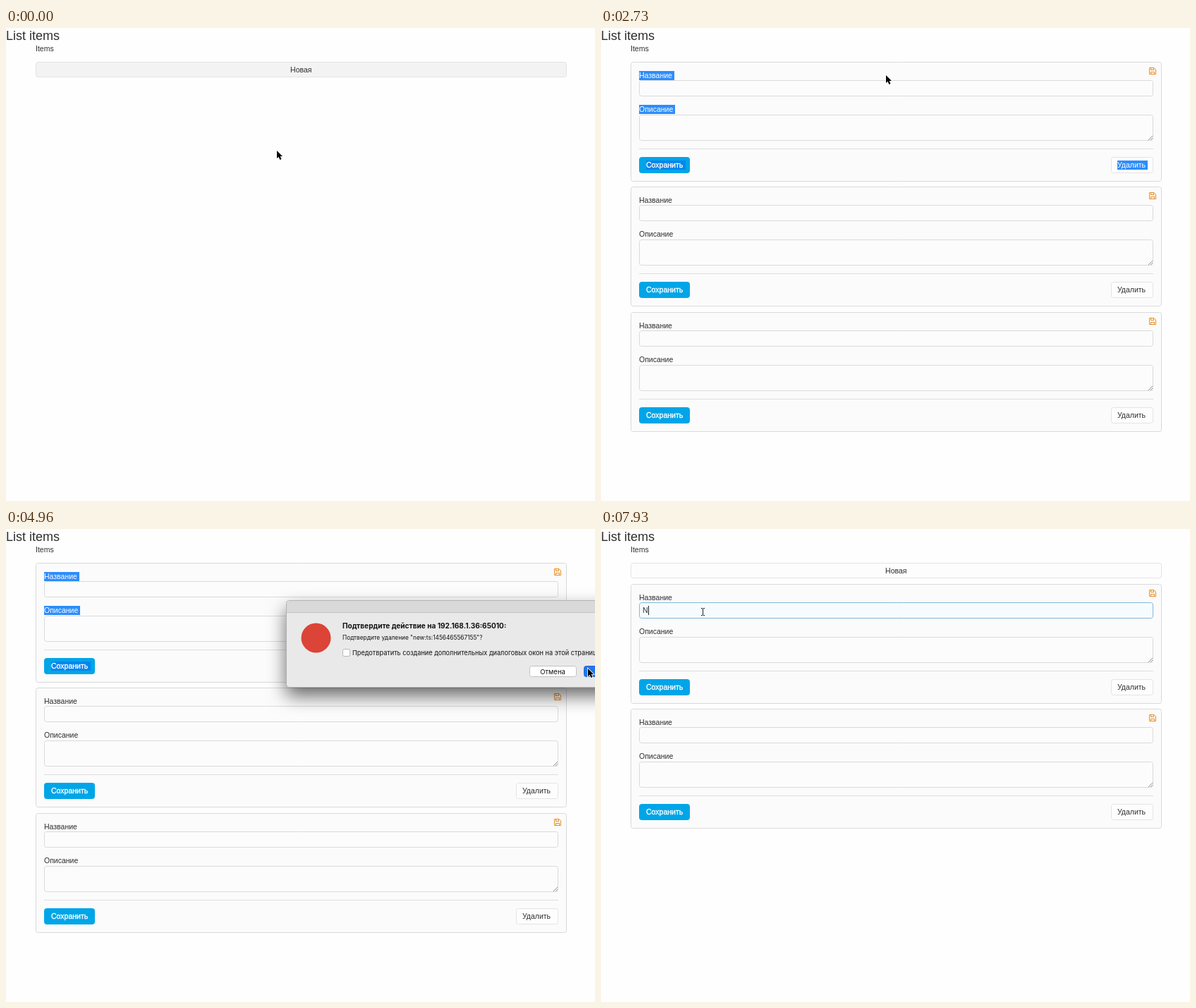
Write an HTML page with a canvas that moves like this. It is 835 by 671 pixels and loops after 8 s.

```html
<!DOCTYPE html>
<html lang="ru">
<head>
<meta charset="utf-8">
<title>List items</title>
<style>
html, body { margin: 0; width: 100%; height: 100%; overflow: hidden; background: #fefefe; }
canvas { display: block; }
</style>
</head>
<body>
<canvas id="stage" width="835" height="671"></canvas>
<script>
const ctx = document.getElementById('stage').getContext('2d');
const LOOP = 8000;
const INK = '#2e2e2e';
const SANS = '"Liberation Sans", Arial, sans-serif';
const SYSTEM = 'Inter, sans-serif';
const UI = '10.5px ' + SANS;
const SELECT = '#2d8dfb';

// [start time, value] lists: the last entry already reached wins.
const at = (steps, t) => steps.reduce((v, s) => (t >= s[0] ? s[1] : v), steps[0][1]);

const pointer = [
  [0, ['arrow', 384, 174]], [470, ['arrow', 388, 143]], [620, ['arrow', 398, 92]],
  [770, ['hand', 404, 67]], [2730, ['arrow', 404, 67]],
  [3470, ['arrow', 489, 170]], [3620, ['arrow', 690, 171]], [3760, ['arrow', 811, 180]],
  [3910, ['arrow', 728, 187]], [4510, ['arrow', 752, 190]], [4660, ['arrow', 794, 195]],
  [4810, ['arrow', 825, 198]], [5400, ['arrow', 760, 190]], [5550, ['arrow', 572, 173]],
  [5700, ['arrow', 227, 146]], [5850, ['beam', 144, 117]]
];
const dialogZoom = [[0, 0], [4060, 0.29], [4210, 0.95], [4360, 1], [5110, 0]];
const typed = [[0, ''], [7050, 'Т'], [7190, 'Ту'], [7640, 'Т'], [7790, ''], [7930, 'N']];
const caretOn = [[0, false], [6000, true], [6450, false], [6900, true]];

function box(x, y, w, h, r, fill, stroke) {
  ctx.beginPath();
  ctx.roundRect(x + 0.5, y + 0.5, w - 1, h - 1, r);
  if (fill) { ctx.fillStyle = fill; ctx.fill(); }
  if (stroke) { ctx.strokeStyle = stroke; ctx.lineWidth = 1; ctx.stroke(); }
}

function rect(x, y, w, h, color) {
  ctx.fillStyle = color;
  ctx.fillRect(x, y, w, h);
}

function text(str, x, y, font = UI, color = INK, align = 'left') {
  ctx.font = font;
  ctx.fillStyle = color;
  ctx.textAlign = align;
  ctx.fillText(str, x, y);
}

function poly(points, close) {
  ctx.beginPath();
  points.forEach(([x, y]) => ctx.lineTo(x, y));
  if (close) ctx.closePath();
}

function label(str, y, selected, width) {
  if (selected) rect(54, y - 10, width, 13, SELECT);
  text(str, 54, y, UI, selected ? '#fff' : INK);
}

function saveIcon(x, y) {
  ctx.strokeStyle = '#ea8e25';
  ctx.lineWidth = 1;
  poly([[x + .5, y + .5], [x + 7, y + .5], [x + 9.5, y + 3], [x + 9.5, y + 9.5], [x + .5, y + 9.5]], true);
  ctx.stroke();
  ctx.strokeRect(x + 2.5, y + 0.5, 4, 3);
  ctx.strokeRect(x + 2.5, y + 6.5, 5, 3);
}

function card(top, { icon = true, selected = false, hover = false, focus = 0, value = '', caret = false } = {}) {
  const y = Math.floor(top);
  const border = '#dadada';
  box(42, y, 753, 170, 3, '#fbfbfb', border);
  if (icon) saveIcon(777, y + 8);

  label('Название', y + 23, selected, 50);
  box(54, y + 26, 729, 23, 3, ['#fcfcfc', '#f8fdfe', '#f5fbff'][focus], [border, '#a9cbd8', '#85b7d9'][focus]);
  text(value, 59, y + 41);
  if (caret) rect(59 + Math.round(ctx.measureText(value).width), y + 31, 1, 13, '#222');

  label('Описание', y + 71, selected, 51);
  box(54, y + 75, 729, 37, 3, '#fcfcfc', border);
  ctx.strokeStyle = '#777';
  ctx.lineWidth = 0.8;
  for (const d of [6, 3]) {
    poly([[782 - d, y + 111], [782, y + 111 - d]]);
    ctx.stroke();
  }

  rect(54, y + 123, 729, 1, '#dedede');
  box(54, y + 135, 72, 23, 3, '#00a5e8', '#00a5e8');
  if (selected) rect(64, y + 140, 56, 13, '#0585ee');
  text('Сохранить', 64, y + 150, UI, '#fff');
  ctx.strokeStyle = '#fff';
  ctx.lineWidth = 0.35;
  ctx.strokeText('Сохранить', 64, y + 150);

  box(723, y + 135, 60, 23, 3, '#fdfdfd', hover ? '#c4c4c4' : '#e4e4e4');
  if (selected) rect(732, y + 140, 43, 13, SELECT);
  text('Удалить', 732, y + 150, UI, selected ? '#fff' : INK);
}

function newButton(fill, border) {
  box(42, 48, 753, 22, 3, fill, border);
  text('Новая', 418.3, 63, UI, INK, 'center');
}

function dialog(scale) {
  const cx = 645, cy = 163;
  ctx.save();
  ctx.globalAlpha = scale < 0.5 ? 0.65 : 1;
  ctx.translate(cx, cy);
  ctx.scale(scale, scale);
  ctx.translate(-cx, -cy);

  ctx.save();
  ctx.shadowColor = 'rgba(0,0,0,.6)';
  ctx.shadowBlur = 26 * scale;
  ctx.shadowOffsetY = 12 * scale;
  box(397, 101, 496, 124, 4, '#e9e9e9');
  ctx.restore();
  box(397, 101, 496, 124, 4, '#e9e9e9', '#b4b4b4');
  ctx.beginPath();
  ctx.roundRect(398, 102, 494, 16, [4, 4, 0, 0]);
  ctx.fillStyle = '#d9d9d9';
  ctx.fill();
  rect(398, 118, 494, 1, '#c3c3c3');

  ctx.fillStyle = '#dc4437';
  ctx.beginPath();
  ctx.arc(439.5, 154.5, 21, 0, 7);
  ctx.fill();

  text('Подтвердите действие на 192.168.1.36:65010:', 477, 141, 'bold 10.1px ' + SYSTEM, '#111');
  text('Подтвердите удаление "new:ts:1456465567155"?', 477, 157, '8.3px ' + SYSTEM, '#111');
  box(477, 170, 11, 11, 2, '#fff', '#b5b5b5');
  text('Предотвратить создание дополнительных диалоговых окон на этой странице.', 491, 179, '9.2px ' + SYSTEM, '#111');
  box(742, 194, 67, 16, 3, '#fff', '#c2c2c2');
  text('Отмена', 775, 206, '9.5px ' + SYSTEM, '#111', 'center');
  box(819, 194, 67, 16, 3, '#2375ee', '#1d68dc');
  text('OK', 852, 206, '9.5px ' + SYSTEM, '#fff', 'center');
  ctx.restore();
}

const cursors = {
  arrow() {
    poly([[0, 0], [0, 11], [2.5, 8.7], [4.4, 13], [6.5, 12.1], [4.7, 8], [8, 8]], true);
    ctx.lineWidth = 1.6;
    ctx.strokeStyle = '#fff';
    ctx.stroke();
    ctx.fillStyle = '#000';
    ctx.fill();
  },
  hand() {
    poly([[-1, 1.5], [0, .5], [1.4, 1.5], [2, 5], [3.6, 4.6], [4.4, 5.4], [6, 5.2], [6.6, 6],
      [7.8, 6.2], [8, 9], [6.8, 13.5], [.6, 13.5], [-1, 10.8], [-3.4, 8], [-2.6, 7], [0, 8]], true);
    ctx.lineJoin = 'round';
    ctx.lineWidth = 1.1;
    ctx.fillStyle = '#fff';
    ctx.fill();
    ctx.strokeStyle = '#000';
    ctx.stroke();
    poly([[2.2, 5], [2.5, 8]]);
    ctx.stroke();
    poly([[4.5, 5.5], [4.7, 8]]);
    ctx.stroke();
  },
  beam() {
    rect(0, -4, 1, 9, '#222');
    for (const y of [-5, 5]) {
      rect(-2, y, 2, 1, '#222');
      rect(1, y, 2, 1, '#222');
    }
  }
};

function cards(t) {
  if (t < 2730) {
    const hover = t >= 770;
    newButton(hover ? '#fefefe' : '#f3f3f3', hover ? '#cacaca' : '#e3e3e3');
    if (t >= 1240) card(78, { icon: t >= 1990 });
    if (t >= 2440) card(255.5);
  } else if (t < 5110) {
    card(48, { selected: true, hover: t >= 3910 });
    card(225.5);
    card(403);
  } else {
    newButton('#fdfdfd', '#e3e3e3');
    card(78, {
      focus: at([[0, 0], [6000, 1], [6150, 2]], t),
      value: at(typed, t),
      caret: at(caretOn, t)
    });
    card(255.5);
  }
}

function draw(t) {
  rect(0, 0, 835, 671, '#fefefe');
  text('List items', 0, 17, '18px ' + SANS);
  text('Items', 42, 33);
  cards(t);

  const zoom = at(dialogZoom, t);
  if (zoom) dialog(zoom);

  const [shape, x, y] = at(pointer, t);
  ctx.save();
  ctx.translate(x, y);
  cursors[shape]();
  ctx.restore();
}

const start = performance.now();
function tick() {
  draw((performance.now() - start) % LOOP);
  requestAnimationFrame(tick);
}
tick();
</script>
</body>
</html>
```
